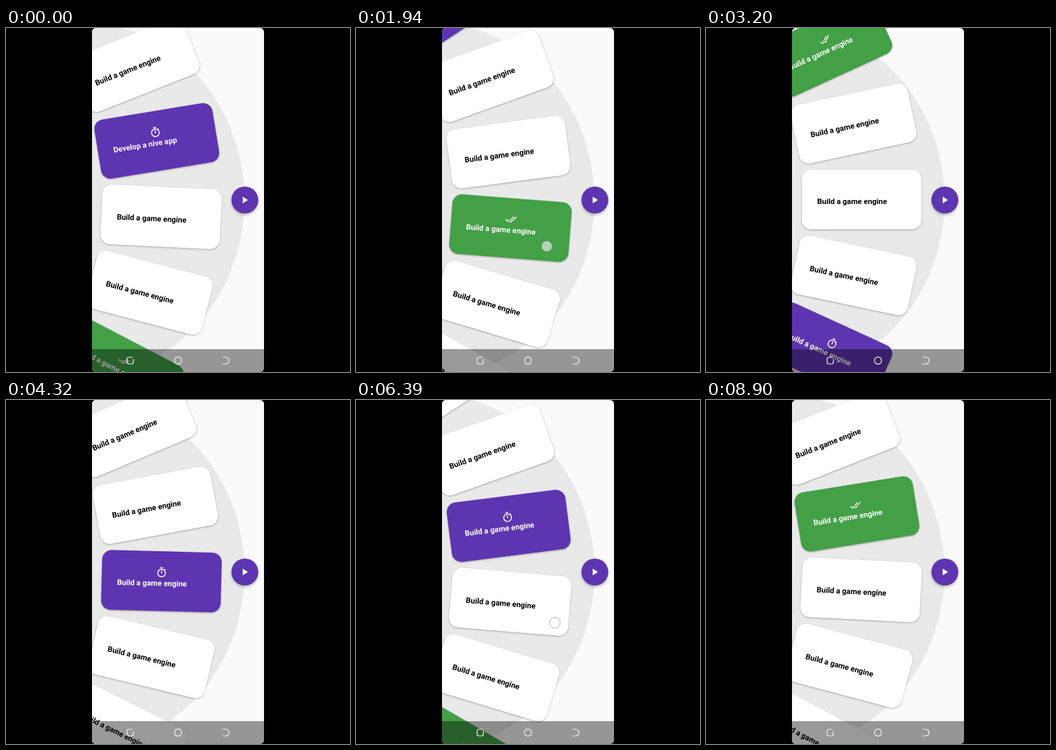
Recreate the animation shown at these times as an HTML page. Size 512x512 px, loop 8920 ms.

```html
<!DOCTYPE html>
<html lang="en">
<head>
<meta charset="utf-8">
<title>Task wheel</title>
<style>
  html, body { margin: 0; width: 100%; height: 100%; overflow: hidden; background: #000; }
  svg { display: block; width: 100vw; height: 100vh; }
  text { font: 700 11.38px Roboto, Arial, sans-serif; }
  .keys { fill: none; stroke: #f4f4f4; stroke-width: 1.2; stroke-linecap: round; }
</style>
</head>
<body>
<svg viewBox="0 0 512 512">
  <defs>
    <clipPath id="screen"><rect x="128" width="256" height="512" rx="6"/></clipPath>
    <filter id="soft" x="-20%" y="-20%" width="140%" height="140%"><feGaussianBlur stdDeviation=".8"/></filter>
    <filter id="softer" x="-30%" y="-30%" width="160%" height="160%"><feGaussianBlur stdDeviation="2"/></filter>
  </defs>
  <g clip-path="url(#screen)">
    <rect x="128" width="256" height="512" fill="#fafafa"/>
    <ellipse cx="109" cy="256" rx="246" ry="265" fill="#e9e9e9"/>
    <g id="wheel"></g>
    <circle cx="355.5" cy="258.5" r="19.5" opacity=".3" filter="url(#softer)"/>
    <circle cx="355.5" cy="256" r="20" fill="#5e35b1"/>
    <path d="M352.3 251.1v9.8l7.8-4.9z" fill="#fff"/>
    <rect x="128" y="478" width="256" height="34" opacity=".4"/>
    <g class="keys">
      <path d="M189.6 493v4a3 3 0 0 1-3 3h-3.400a3 3 0 0 1-3-3v-4a3 3 0 0 1 3-3h4.800"/>
      <circle cx="256" cy="495" r="5.300"/>
      <path d="M322.500 490h4.500a5 5 0 0 1 0 10h-4.500"/>
    </g>
    <circle id="finger" r="8" fill="#fff" fill-opacity=".58" stroke="#777" stroke-opacity=".6"/>
  </g>
</svg>
<script>
const NS = 'http://www.w3.org/2000/svg';
const LOOP = 8920, PITCH = 113, RADIUS = 543, HUB_X = -311.5, HUB_Y = 255.5;
const TIMER = 'M15 1H9v2h6V1zm-4 13h2V8h-2v6zm8.03-6.61l1.42-1.42c-.43-.51-.9-.99-1.41-1.41l-1.42 1.42C16.07 4.74 14.12 4 12 4c-4.97 0-9 4.03-9 9s4.02 9 9 9 9-4.03 9-9c0-2.12-.74-4.07-1.97-5.61zM12 20c-3.87 0-7-3.13-7-7s3.13-7 7-7 7 3.13 7 7-3.13 7-7 7z';
const DONE = 'M18 7l-1.41-1.41-6.34 6.34 1.41 1.41L18 7zm4.24-1.41L11.66 16.17 7.48 12l-1.41 1.41L11.66 19l12-12-1.42-1.41zM.41 13.41L6 19l1.41-1.41L1.83 12 .41 13.41z';
const LOOKS = {
  plain: { fill: '#fff', ink: '#000', icon: '' },
  timed: { fill: '#5e35b1', ink: '#fff', icon: TIMER },
  done: { fill: '#43a047', ink: '#fff', icon: DONE }
};

// Scroll offset in pixels at given times
const SCROLL = [[530, 87.5], [760, 130], [1090, 130], [1940, 296.5], [3200, 565],
  [5050, 953.5], [6390, 1649.7], [7280, 2007]];
// Touches: start, end, and a time with the finger's place then
const TOUCHES = [
  { from: 1860, to: 2300, at: 1940, x: 284, y: 325 },
  { from: 4700, to: 5080, at: 5050, x: 283, y: 218 },
  { from: 6330, to: 6620, at: 6390, x: 296, y: 332 }
];

function add(parent, tag, attrs) {
  const el = document.createElementNS(NS, tag);
  for (const name in attrs) el.setAttribute(name, attrs[name]);
  return parent.appendChild(el);
}

const box = { x: -89, y: -44.5, width: 178, height: 89, rx: 14.2 };
const wheel = document.getElementById('wheel');
const finger = document.getElementById('finger');
const cards = Array.from({ length: 7 }, () => {
  const g = add(wheel, 'g', {});
  add(g, 'rect', { ...box, y: -43.5, opacity: .3, filter: 'url(#soft)' });
  return {
    g,
    face: add(g, 'rect', box),
    icon: add(g, 'path', { transform: 'translate(0 -13) scale(.711) translate(-12 -12)' }),
    label: add(g, 'text', { x: -66, y: 7 })
  };
});

const slope = i => (SCROLL[i + 1][1] - SCROLL[i][1]) / (SCROLL[i + 1][0] - SCROLL[i][0]);

// Harmonic mean keeps the curve from turning back
function tangent(i) {
  if (i === 0 || i === SCROLL.length - 1) return 0;
  const a = slope(i - 1), b = slope(i);
  return a * b > 0 ? 2 * a * b / (a + b) : 0;
}

function scrollAt(t) {
  const last = SCROLL.length - 1;
  if (t <= SCROLL[0][0]) return SCROLL[0][1];
  if (t >= SCROLL[last][0]) return SCROLL[last][1];
  const i = SCROLL.findIndex((key, n) => t < SCROLL[n + 1][0]);
  const [t0, a] = SCROLL[i], [t1, b] = SCROLL[i + 1];
  const d = t1 - t0, u = (t - t0) / d, v = 1 - u;
  return a * (1 + 2 * u) * v * v + b * u * u * (3 - 2 * u)
    + d * u * v * (tangent(i) * v - tangent(i + 1) * u);
}

function lookOf(index) {
  const n = (index % 7 + 7) % 7;
  return n === 0 ? LOOKS.timed : n === 3 ? LOOKS.done : LOOKS.plain;
}

function render(t) {
  const scroll = scrollAt(t);
  const first = Math.ceil((scroll - 330) / PITCH);
  cards.forEach((card, i) => {
    // Cards are evenly spaced in height; the rim gives their tilt
    const index = first + i, y = index * PITCH - scroll, tilt = Math.asin(y / RADIUS);
    const x = HUB_X + RADIUS * Math.cos(tilt), look = lookOf(index);
    card.g.setAttribute('transform', `translate(${x} ${HUB_Y + y}) rotate(${tilt * 180 / Math.PI})`);
    card.face.setAttribute('fill', look.fill);
    card.icon.setAttribute('d', look.icon);
    card.icon.setAttribute('fill', look.ink);
    card.label.setAttribute('fill', look.ink);
    card.label.textContent = index === 0 ? 'Develop a nive app' : 'Build a game engine';
  });

  const touch = TOUCHES.find(p => t >= p.from && t < p.to);
  finger.style.display = touch ? '' : 'none';
  if (touch) {
    finger.setAttribute('cx', touch.x);
    finger.setAttribute('cy', touch.y - scroll + scrollAt(touch.at));
  }
}

const start = performance.now();
function tick(now) {
  render(Math.max(0, now - start) % LOOP);
  requestAnimationFrame(tick);
}
render(0);
requestAnimationFrame(tick);
</script>
</body>
</html>
```
